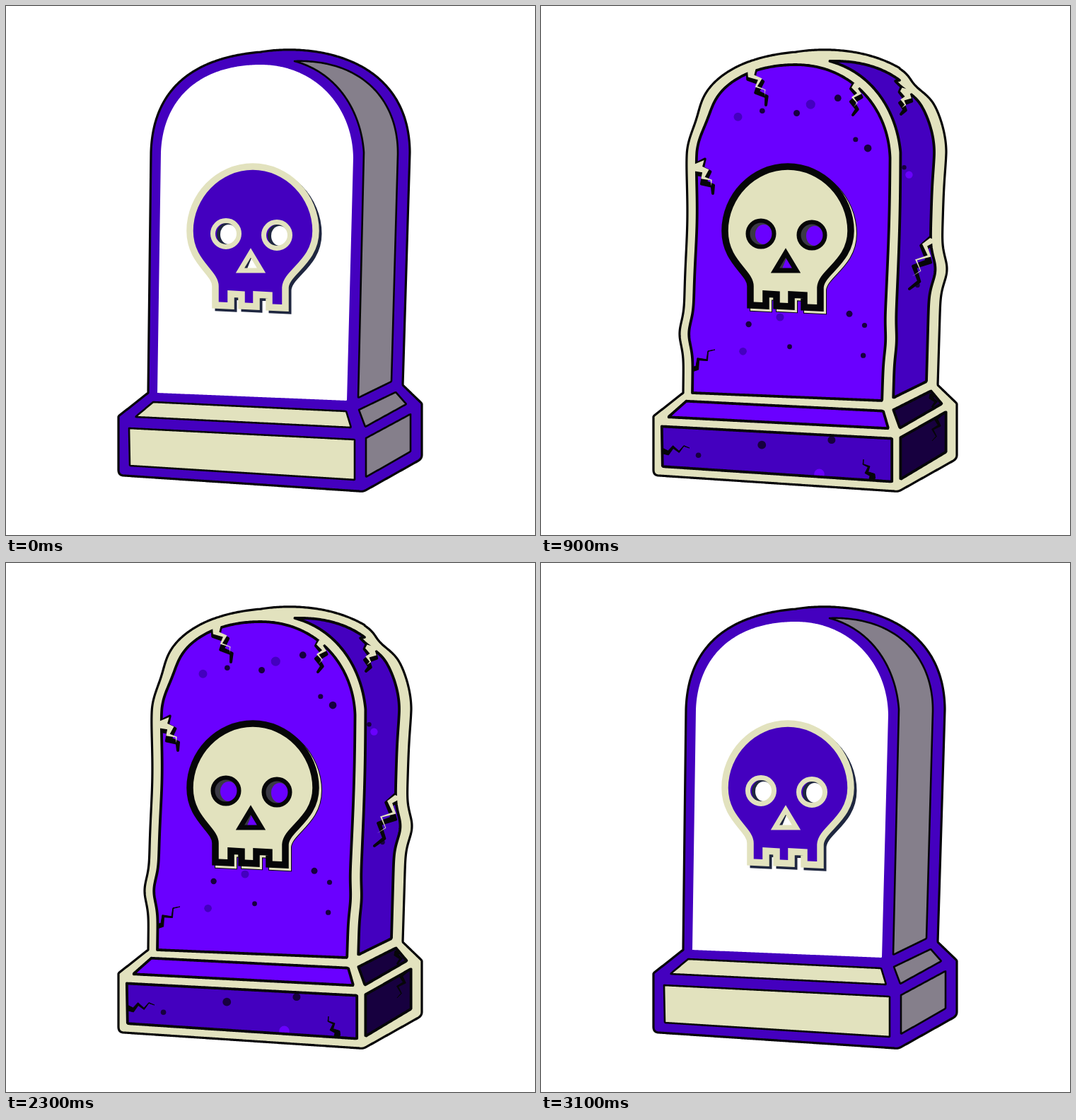
An HTML page with a canvas for the animation above (3.2 s loop, 748x748 px).

```html
<!DOCTYPE html>
<html lang="en">
<head>
<meta charset="utf-8">
<title>Tombstone</title>
<style>
html, body { margin: 0; width: 100%; height: 100%; overflow: hidden; background: #fff; }
canvas { display: block; width: 100vw; height: 100vh; }
</style>
</head>
<body>
<canvas id="stage" width="748" height="748"></canvas>
<script>
const ctx = document.getElementById('stage').getContext('2d');
const STEP = 100, LOOP = 3200;
const VIOLET = '#4400bf', BRIGHT = '#6a00ff', DARK = '#17003f', BLACK = '#060608';

// Every property has four values: fresh, fading, worn, old.
const KEYS = [1, 4, 9, 14];
const WORN = [0, 0, 1, 1], OLD = [0, 0, 0, 1];
let seg = 0, mix = 0;
function seek(n) {
  seg = n >= 9 ? 2 : n >= 4 ? 1 : 0;
  mix = (n - KEYS[seg]) / (KEYS[seg + 1] - KEYS[seg]);
}
const lerp = (a, b) => a + (b - a) * mix;
const num = keys => lerp(keys[seg], keys[seg + 1]);
function tint(keys) {
  const [a, b] = keys.split(' ').slice(seg, seg + 2).map(h => parseInt(h, 16));
  const ch = s => Math.round(lerp(a >> s & 255, b >> s & 255));
  return `rgb(${ch(16)},${ch(8)},${ch(0)})`;
}

function sample(d) {
  const el = document.createElementNS('http://www.w3.org/2000/svg', 'path');
  el.setAttribute('d', d);
  const points = [], total = el.getTotalLength();
  for (let s = 0; s < total; s += 2) {
    const { x, y } = el.getPointAtLength(s);
    points.push([x, y]);
  }
  return points;
}
function polygon(points) {
  const p = new Path2D();
  points.forEach(pt => p.lineTo(...pt));
  p.closePath();
  return p;
}
function bounds(points) {
  const xs = points.map(p => p[0]), ys = points.map(p => p[1]);
  const x = Math.min(...xs), y = Math.min(...ys);
  return { x, y, w: Math.max(...xs) - x, h: Math.max(...ys) - y };
}

// Erosion pushes each upright edge sideways: height, push, spread, age
const dents = {
  left: [[160, 7, 32, WORN], [300, 3, 70, WORN], [463, -6, 24, WORN], [222, 7, 8, OLD]],
  ridge: [[300, 3.5, 150, WORN], [475, 2, 24, WORN]],
  right: [[112, -8, 15, WORN], [373, 8, 25, WORN], [205, 2, 40, WORN]]
};
function erode([x, y]) {
  const edge = x < 300 ? 'left' : x > 507 ? 'right' : 'ridge';
  let push = 0;
  for (const [at, depth, spread, age] of dents[edge]) {
    push += depth * num(age) * Math.exp(-(((y - at) / spread) ** 2));
  }
  return [x + push, y];
}
function swell({ x, y, w, h }) {
  const g = num(WORN), cx = x + w / 2, cy = y + h / 2;
  return ([px, py]) => [px + (px - cx) * .02 * g, py + (py - cy) * .07 * g];
}

const stone = sample('M201 547L205 207C207 140 240 75 360 65C440 52 570 75 571 207L561 536L588 562V635Q588 640 583 643L510 684Q505 687 499 686L167 664Q159 664 159 656V580Z');

function panel(d, fill, upright, line = [2.6, 2.6, 3.8, 3.8]) {
  const points = sample(d);
  return { points, fill, upright, line, box: bounds(points) };
}
const panels = {
  face: panel('M214 547L219 207C222 130 275 83 360 83C435 83 490 140 491 215L482 558Z',
    'ffffff a292c5 6a00ff 6a00ff', true, [0, 0, 3.8, 3.8]),
  side: panel('M408 78C500 75 555 130 554 210L545 531L498 554L506 207C502 150 470 95 408 78Z',
    '857f8b 7e7088 4400bf 4400bf', true),
  ledge: panel('M208 560L481 573L488 596L183 581Z', 'e2e2be a69abd 6a00ff 4400bf'),
  ledgeSide: panel('M499 571L551 546L566 563L508 595Z', '857f8b 7e7088 17003f 17003f'),
  base: panel('M174 597L493 613V670L175 650Z', 'e2e2be a89cbe 4400bf 6a00ff'),
  baseSide: panel('M509 611L572 577V630L509 666Z', '857f8b 7e7088 17003f 4400bf')
};

function random(seed) {
  return () => (seed = seed * 16807 % 2147483647) / 2147483647;
}
// Specks strewn over a panel: colour, count, radius, stretch
function specks(name, color, count, radius, stretch, age, seed) {
  const rnd = random(seed * 7919), { x, y, w, h } = panels[name].box;
  const dots = Array.from({ length: count }, () => {
    const r = radius * (.7 + .6 * rnd());
    return [x + w * (.08 + .84 * rnd()), y + h * (.06 + .88 * rnd()), r, r * stretch];
  });
  return { name, color, dots, age };
}
const SMALL = [0, 0, 1, 0];
const strewn = [
  specks('face', DARK, 11, 4.5, 1, SMALL, 3),
  specks('face', VIOLET, 6, 6, 1, SMALL, 8),
  specks('side', DARK, 4, 4, 1, SMALL, 5),
  specks('side', BRIGHT, 4, 5, 1, SMALL, 11),
  specks('base', DARK, 3, 5, 1, SMALL, 13),
  specks('base', BRIGHT, 2, 6, 1, SMALL, 17),
  specks('face', DARK, 10, 5.5, 1.7, OLD, 23),
  specks('face', VIOLET, 6, 4, 1, OLD, 29),
  specks('side', DARK, 4, 4.5, 2.4, OLD, 31),
  specks('side', BRIGHT, 2, 4, 1.5, OLD, 37),
  specks('base', VIOLET, 1, 4, 1.2, OLD, 41)
];

// Wavy stain running in from the top (dir -1) or bottom (dir 1) of a panel
function stain(name, color, dir, level, slope, wave) {
  const { x, y, w, h } = panels[name].box;
  const from = dir < 0 ? y - 10 : y + h + 10;
  const points = [[x - 10, from]];
  for (let u = -10; u <= w + 10; u += 3) {
    const ripple = Math.sin(u / wave * .9 + 2) + .5 * Math.sin(u / wave * 1.9);
    points.push([x + u, level + slope * u + wave * ripple]);
  }
  points.push([x + w + 10, from]);
  return { name, color, from, path: polygon(points) };
}
const stains = [
  stain('face', VIOLET, -1, 142, .13, 14),
  stain('face', DARK, 1, 548, -.04, 10),
  stain('side', DARK, -1, 190, .08, 7),
  stain('side', DARK, 1, 555, -.4, 7),
  stain('ledge', DARK, 1, 580, .02, 6),
  stain('base', VIOLET, -1, 603, .04, 6),
  stain('baseSide', DARK, -1, 618, -.3, 5)
];

// Tapered zigzag from an edge (x, y) to a tip
function crack(name, x, y, tipX, tipY, width = 4, wedge = false, first = 0) {
  const dx = tipX - x, dy = tipY - y, len = Math.hypot(dx, dy);
  const nx = -dy / len, ny = dx / len, near = [], far = [];
  for (let k = 0; k <= 5; k++) {
    const s = k / 5, half = width * (1 - s) ** 1.4;
    const zig = k % 5 ? (k % 2 ? .1 : -.1) * len : 0;
    const at = o => [x + dx * s + nx * o, y + dy * s + ny * o];
    near.push(at(zig + half));
    far.unshift(at(zig - half));
  }
  return { name, x, y, wedge, path: polygon([...near, ...far]), growth: [0, first, 1, 1.25] };
}
const cracks = [
  crack('face', 298, 90, 318, 140, 7, true, .3),
  crack('face', 449, 110, 441, 154, 7, true),
  crack('side', 520, 118, 509, 153, 11, true, .3),
  crack('face', 221, 222, 243, 265, 12, true),
  crack('face', 211, 514, 246, 486),
  crack('side', 555, 330, 521, 400, 6, true),
  crack('base', 172, 629, 210, 625),
  crack('base', 468, 670, 456, 641, 5),
  crack('ledgeSide', 554, 548, 558, 578),
  crack('baseSide', 564, 577, 553, 615)
];

const skull = new Path2D('M296 423V396C296 376 260 362 260 318C260 269 300 227 349 227S438 269 438 318C438 362 396 376 395 398V427L372 426V409L354 408V425L333 424V408L318 407V424Z');
const nose = new Path2D('M346 349L331 374H361Z');
const noseHole = new Path2D('M348 354L340 374H361Z');

function paint(path, fill, line, width) {
  if (fill) { ctx.fillStyle = fill; ctx.fill(path); }
  if (width > 0) { ctx.strokeStyle = line; ctx.lineWidth = width; ctx.stroke(path); }
}
function within(path, draw) {
  ctx.save();
  ctx.clip(path);
  draw();
  ctx.restore();
}
function grown(x, y, sx, sy, draw) {
  if (sx <= 0 || sy <= 0) return;
  ctx.save();
  ctx.translate(x, y);
  ctx.scale(sx, sy);
  ctx.translate(-x, -y);
  draw();
  ctx.restore();
}
function disc(x, y, rx, ry, fill) {
  ctx.fillStyle = fill;
  ctx.beginPath();
  ctx.ellipse(x, y, rx, ry, 0, 0, 7);
  ctx.fill();
}

function drawPanel(name, border) {
  const { points, fill, upright, line, box } = panels[name];
  const path = polygon(points.map(upright ? erode : swell(box)));
  const here = item => item.name === name;
  const own = cracks.filter(here);
  paint(path, tint(fill));
  within(path, () => {
    for (const s of stains.filter(here)) grown(0, s.from, 1, num(OLD), () => paint(s.path, s.color));
    for (const { color, dots, age } of strewn.filter(here)) {
      const size = num(age);
      if (size > 0) dots.forEach(([x, y, rx, ry]) => disc(x, y, rx * size, ry * size, color));
    }
    for (const c of own) {
      const g = num(c.growth) * num(WORN);
      grown(c.x, c.y, g, g, () => paint(c.path, BLACK, BLACK, c.wedge ? 4 : 1));
    }
  });
  paint(path, null, BLACK, num(line));
  for (const c of own.filter(c => c.wedge)) {
    const g = num(c.growth) * .75;
    grown(c.x, c.y, g * 1.2, g, () => paint(c.path, border));
  }
}

function drawSkull() {
  const bone = tint('4400bf 6a3cbd e2e2be 857f8b');
  const rim = tint('e2e2be afa7b7 060608 060608');
  const shade = tint('1f2740 2d2f48 e2e2be 3b3a45');
  const depth = tint('1f2740 2d2f48 3b3a45 3b3a45');
  const hole = tint(panels.face.fill);
  ctx.lineJoin = 'miter';
  ctx.save();
  ctx.translate(4, 4);
  paint(skull, null, BLACK, num([0, 0, 10, 0]));
  paint(skull, shade, shade, num([9, 9, 8, 9]));
  ctx.restore();
  paint(skull, bone, rim, 9.5);

  for (const [x, y] of [[311, 322], [383, 324]]) {
    const ring = new Path2D();
    ring.arc(x, y, 18.5, 0, 7);
    paint(ring, tint('4400bf 4400bf 3b3a45 3b3a45'));
    within(ring, () => {
      disc(x + 3, y + 1, 16, 17, depth);
      disc(x + 4, y + 1, 12, 14, hole);
    });
    paint(ring, null, rim, num([7, 7, 6, 6]));
  }
  paint(nose, depth);
  paint(noseHole, hole);
  paint(nose, null, rim, 7);
}

function draw(n) {
  seek(n);
  const border = tint('4400bf 7e4ae0 e2e2be 857f8b');
  ctx.fillStyle = '#fff';
  ctx.fillRect(0, 0, 748, 748);
  ctx.lineJoin = 'round';
  paint(polygon(stone.map(erode)), border, BLACK, 3.2);
  for (const name in panels) drawPanel(name, border);
  drawSkull();
}

// Fourteen steps of decay, a pause, then the same steps back.
const start = performance.now();
function frame() {
  const k = Math.floor((performance.now() - start) % LOOP / STEP);
  draw(Math.max(1, Math.min(k, LOOP / STEP - k, 14)));
  requestAnimationFrame(frame);
}
frame();
</script>
</body>
</html>
```
